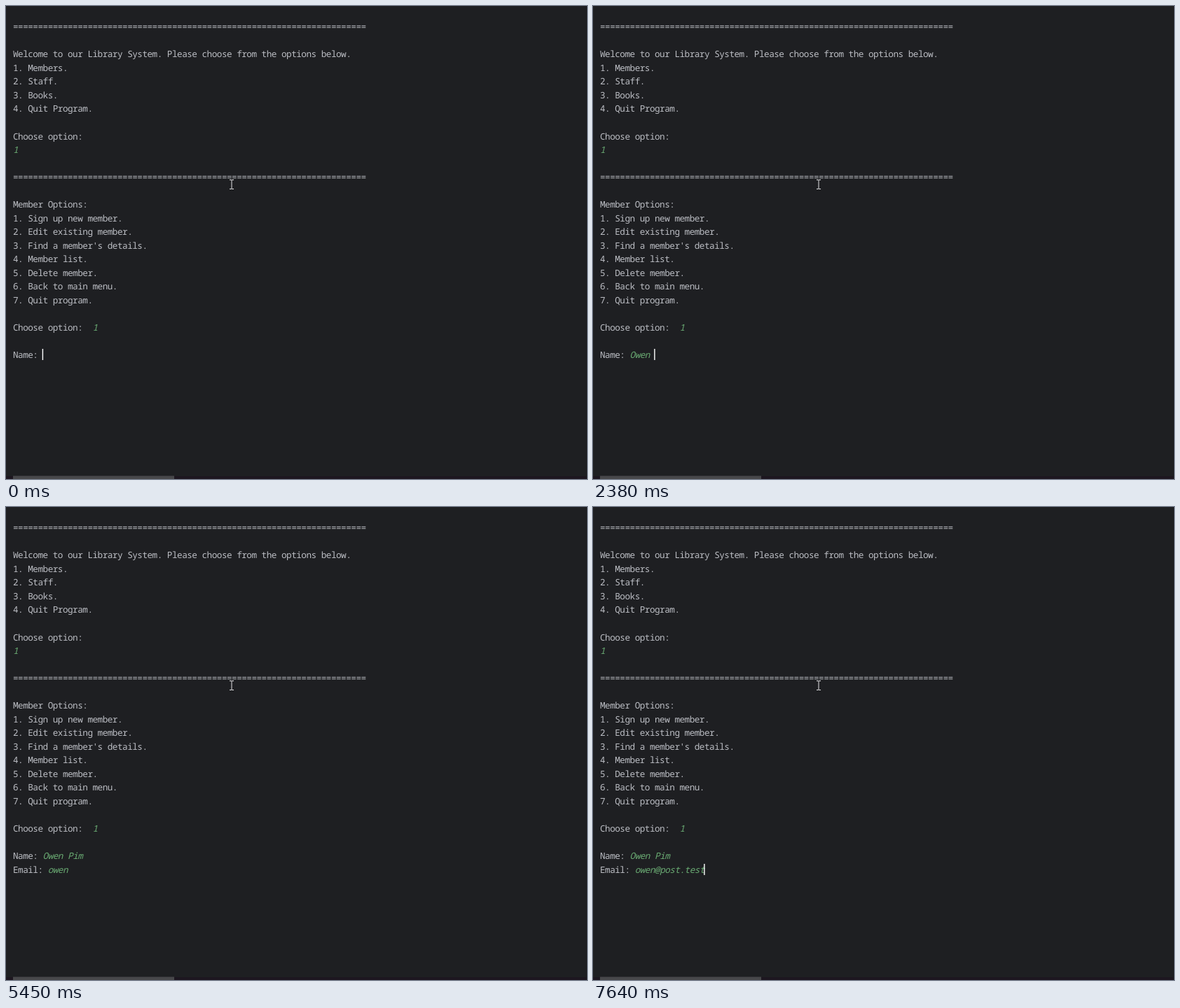
An HTML page that plays this animation: 829 by 676 pixels, repeating every 8000 ms.

```html
<!DOCTYPE html>
<html lang="en">
<head>
<meta charset="utf-8">
<title>Library console</title>
<style>
  html, body { margin: 0; width: 100%; height: 100%; overflow: hidden; background: #1e1f22; }
  svg { display: block; width: 829px; height: 676px; }
  text {
    font: 12.7px "Noto Sans Mono", "DejaVu Sans Mono", monospace;
    letter-spacing: -0.52px;
    fill: #bcbec4;
    white-space: pre;
    text-rendering: geometricPrecision;
    font-variant-ligatures: none;
  }
  .input { font-style: italic; fill: #6aab73; }
</style>
</head>
<body>
<svg id="stage" viewBox="0 0 829 676">
  <rect y="672" width="829" height="4" fill="#1d1620"/>
  <rect x="10" y="671.5" width="230" height="4.5" fill="#47474a"/>
  <rect x="828" width="1" height="676" fill="#19191c"/>
  <g id="lines"></g>
  <rect id="caret" width="1.4" height="16" fill="#fff"/>
  <path d="M319 248.5h2.5l.5.5.5-.5h2.5M322 249v12M319 261.5h2.5l.5-.5.5.5h2.5" fill="none" stroke="#e4e4e6"/>
</svg>
<script>
const LOOP = 8000, LEFT = 10, CHAR = 7.1, ROW = 19.53;
const NAME_ROW = 24, EMAIL_ROW = 25;
const rule = "=".repeat(71);
const screen = [
  rule, "",
  "Welcome to our Library System. Please choose from the options below.",
  "1. Members.", "2. Staff.", "3. Books.", "4. Quit Program.", "",
  "Choose option:", "", "",
  rule, "",
  "Member Options:",
  "1. Sign up new member.", "2. Edit existing member.", "3. Find a member's details.",
  "4. Member list.", "5. Delete member.", "6. Back to main menu.", "7. Quit program.", "",
  "Choose option:", "",
  "Name:"
];

// Typed keys by time; an empty entry is the caret blinking off.
const keys = [
  [270, "O"], [550, "w"], [1180, "n"], [1830, "\b"], [1970, "e"], [2090, "n"],
  [2380, " "], [2640, "P"], [2780, "im"], [3060, "\n"], [3950, ""],
  [4450, "o"], [4570, "w"], [4820, "e"], [4940, "n"], [5450, ""], [5960, "@"],
  [6350, "p"], [6470, "o"], [6600, "st"], [6880, "."], [7390, "te"], [7640, "st"]
];

const lines = document.getElementById("lines");
const caret = document.getElementById("caret");

function addText(row, col, content, cls = "") {
  const el = document.createElementNS("http://www.w3.org/2000/svg", "text");
  el.setAttribute("x", LEFT + col * CHAR);
  el.setAttribute("y", 34.3 + row * ROW);
  el.setAttribute("class", cls);
  el.textContent = content;
  return lines.appendChild(el);
}

screen.forEach((line, row) => line && addText(row, 0, line));
addText(9, 0, "1", "input");
addText(22, 16, "1", "input");
const nameInput = addText(NAME_ROW, 6, "", "input");
const emailPrompt = addText(EMAIL_ROW, 0, "");
const emailInput = addText(EMAIL_ROW, 7, "", "input");

function draw(time) {
  let typed = "", caretOn = true;
  for (const [at, key] of keys) {
    if (at > time) break;
    typed = key === "\b" ? typed.slice(0, -1) : typed + key;
    caretOn = key !== "";
  }
  const [name, email] = typed.split("\n");
  const onEmail = email !== undefined;
  nameInput.textContent = name;
  emailPrompt.textContent = onEmail ? "Email:" : "";
  emailInput.textContent = email || "";

  const col = onEmail ? 7 + email.length : 6 + name.length;
  caret.setAttribute("x", LEFT - 0.9 + col * CHAR);
  caret.setAttribute("y", onEmail ? 510 : 490);
  caret.setAttribute("visibility", caretOn ? "visible" : "hidden");
}

const start = performance.now();
function tick() {
  draw((performance.now() - start) % LOOP);
  requestAnimationFrame(tick);
}
tick();
</script>
</body>
</html>
```
